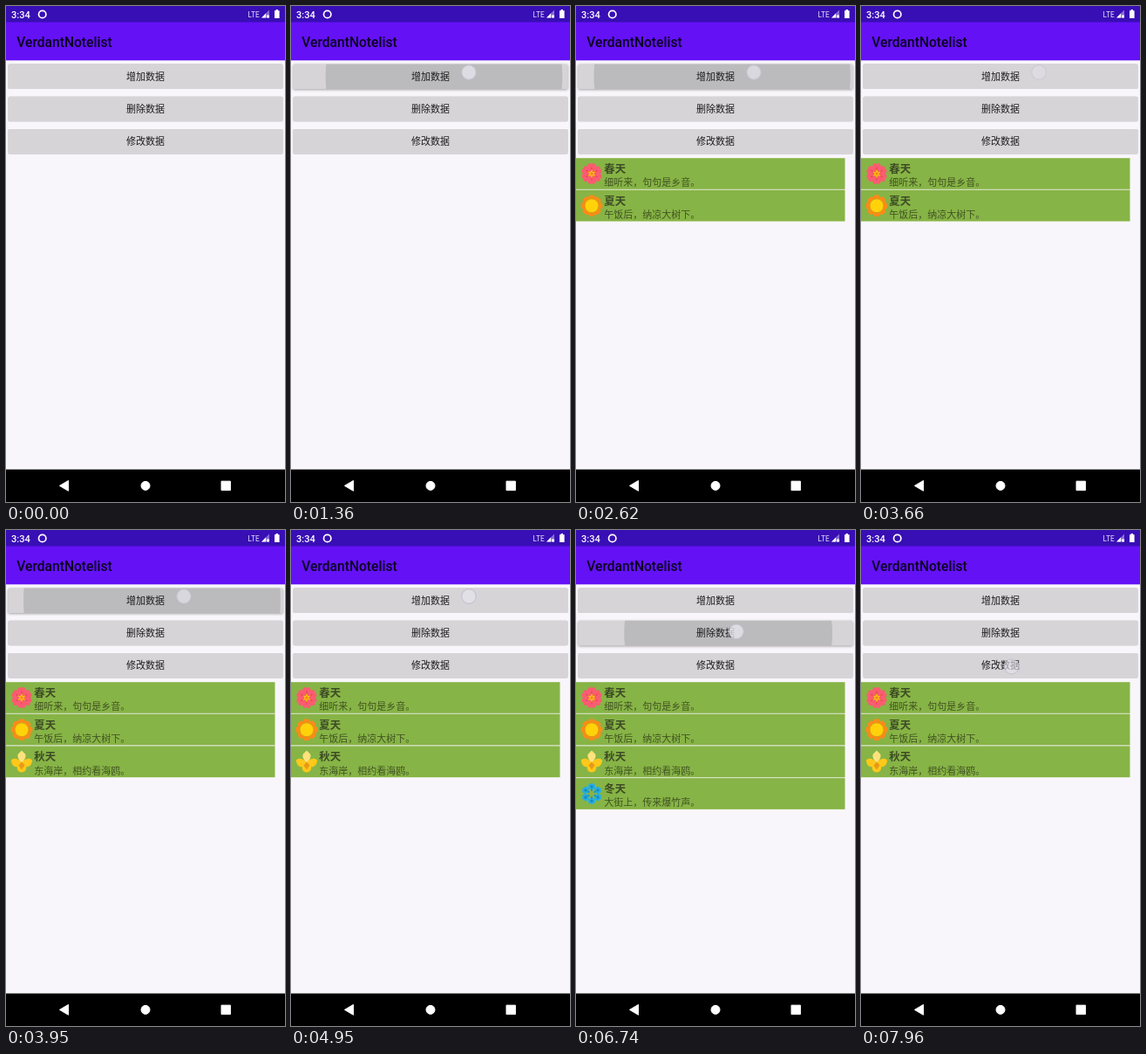
Animation, 320 px wide and 568 px high, one loop 8000 ms. Source, as an HTML page:

```html
<!DOCTYPE html>
<html lang="zh">
<head>
<meta charset="utf-8">
<title>Season list</title>
<style>
  html, body { margin: 0; width: 100%; height: 100%; overflow: hidden; background: #f8f6fa; }
  svg { display: block; width: 320px; height: 568px; }
  text { font-family: Roboto, "Noto Sans CJK SC", "Noto Sans CJK", sans-serif; }
  .label, .title, .verse { font-family: "Noto Sans CJK SC", "Noto Sans CJK", sans-serif; }
  .label { font-size: 11px; fill: #1d1c1e; text-anchor: middle; }
  .title { font-size: 12.4px; font-weight: 700; fill: #3d4c25; }
  .verse { font-size: 11px; fill: #405322; }
</style>
</head>
<body>
<svg viewBox="0 0 320 568">
  <rect width="320" height="568" fill="#f8f6fa"/>
  <rect y="18" width="320" height="44.3" fill="#6411f6"/>
  <rect width="320" height="18.5" fill="#380eb5"/>
  <text x="12.3" y="46.6" font-size="15.6" font-weight="500" fill="#0b0320">VerdantNotelist</text>

  <g fill="#fff">
    <text x="6" y="13.6" font-size="11.1" font-weight="500">3:34</text>
    <circle cx="41.7" cy="9.5" r="4.2" fill="none" stroke="#fff" stroke-width="1.7"/>
    <text x="277.6" y="12.6" font-size="8.3" fill="#e4def5">LTE</text>
    <path d="M293 13.6 302 4.6V13.6Z" fill-opacity=".4"/>
    <path d="M293 13.6 298 8.6V13.6ZM299 10.5h3v3.1h-3Z"/>
    <path d="M308 5.3h1.6v-1.2h2.4v1.2h1.6v8.6h-5.6Z"/>
  </g>

  <g id="rows"></g>
  <g id="buttons"></g>
  <circle id="dot" r="8.3" fill="#e6e5ec" fill-opacity=".8" stroke="#c3c2d0" stroke-width="1.2"/>

  <rect y="530.7" width="320" height="37.3"/>
  <g fill="#fff" stroke="#fff" stroke-linejoin="round">
    <path d="M61.5 549.4 71.5 543.5V555.3Z"/>
    <circle cx="160" cy="549.4" r="5"/>
    <rect x="247" y="544.2" width="10.4" height="10.4"/>
  </g>
</svg>
<script>
const LOOP = 8000, ENTER = 225, EXIT = 150, DOT_FADE = 200;
const BUTTON = { x: 2.5, width: 315, height: 28.6, middle: 160 };
const START_RADIUS = BUTTON.width * 0.3;
const END_RADIUS = Math.hypot(BUTTON.width, BUTTON.height) / 2;

// Each tap: finger down, ripple start and finger up in ms.
const taps = [
  { button: 0, x: 204, y: 76, down: 1080, ripple: 1215, up: 1430 },
  { button: 0, x: 204, y: 76, down: 2300, ripple: 2435, up: 2600 },
  { button: 0, x: 204, y: 76, down: 3640, ripple: 3764, up: 3920 },
  { button: 0, x: 204, y: 76, down: 4900, ripple: 5028, up: 5195 },
  { button: 1, x: 184, y: 116.3, down: 6570, ripple: 6653, up: 7100 },
  { button: 2, x: 172.7, y: 156.5, down: 7920, ripple: 8020, up: 8200 }
];

const clamp = v => Math.max(0, Math.min(1, v));
const mix = (a, b, p) => a + (b - a) * p;
const ring = (count, shape) =>
  Array.from({ length: count }, (_, i) => `<g transform="rotate(${i * 360 / count})">${shape}</g>`).join('');

const flower =
  ring(6, '<path d="M0 0C-7-5-5.5-12-1.5-12L0-11 1.5-12C5.5-12 7-5 0 0" fill="#fb5c71"/>') +
  ring(6, '<path d="M-1.4 0 0-8.5 1.4 0Z" fill="#c92f45"/>') +
  ring(6, '<path d="M-1.8 0 0-5.8 1.8 0Z" fill="#ffc516"/>') +
  '<circle r="1.8" fill="#f58a1d"/>';
const sun =
  ring(8, '<path d="M-4.6-8 -2.7-12.3H2.7L4.6-8 0-6Z" fill="#fb8b17"/>') +
  '<circle r="8" fill="#ffd20a" stroke="#d99a18" stroke-width="1"/>';
const blossom =
  '<path d="M0 1C-6-4-5-9-3-10L0-13 3-10C5-9 6-4 0 1" fill="#ffe27b"/>' +
  '<path d="M0 1C-4-4-9-5-12-2C-12 3-9 6-5 6C-6 9-3 12 0 12C3 12 6 9 5 6C9 6 12 3 12-2C9-5 4-4 0 1" fill="#ffc81a"/>' +
  '<path d="M0 0-3.5 4 0 9 3.5 4Z" fill="#e69a16"/>';
const snowflake =
  ring(6, '<path d="M0-4-3.9-6.2V-10.2L0-12.3 3.9-10.2V-6.2Z" fill="#25aee2"/><circle cy="-8.2" r="1.5" fill="#1685be"/>') +
  ring(6, '<path d="M0-3V-6" stroke="#1c93cb" stroke-width="1.6"/>');

const seasons = [
  ['春天', '细听来，句句是乡音。', flower],
  ['夏天', '午饭后，纳凉大树下。', sun],
  ['秋天', '东海岸，相约看海鸥。', blossom],
  ['冬天', '大街上，传来爆竹声。', snowflake]
];

const byId = id => document.getElementById(id);
byId('rows').innerHTML = seasons.map(([title, verse, icon], i) => `
  <g transform="translate(0 ${174.2 + i * 36.65})">
    ${i ? '<rect y="-1" width="308.5" height="1" fill="#d5dfc4"/>' : ''}
    <rect width="308.5" height="35.7" fill="#87b446"/>
    <g transform="translate(18 17.9)">${icon}</g>
    <text class="title" x="32.3" y="16.9">${title}</text>
    <text class="verse" x="32.3" y="32.2">${verse}</text>
  </g>`).join('');

byId('buttons').innerHTML = ['增加数据', '删除数据', '修改数据'].map((label, i) => {
  const y = 66.4 + i * 37.3;
  const box = `x="${BUTTON.x}" y="${y}" width="${BUTTON.width}" height="${BUTTON.height}" rx="1.5"`;
  return `<g>
    <clipPath id="clip${i}"><rect ${box}/></clipPath>
    <rect class="face" ${box} fill="#d6d4d7"/>
    <g clip-path="url(#clip${i})"><circle class="ripple" cy="${y + BUTTON.height / 2}"/></g>
    <text class="label" x="${BUTTON.middle}" y="${y + 18.4}">${label}</text>
  </g>`;
}).join('');

const rows = [...byId('rows').children];
const faces = [...document.querySelectorAll('.face')];
const ripples = [...document.querySelectorAll('.ripple')];
const dot = byId('dot');

function draw(t) {
  const removal = taps[4].up;
  rows.forEach((row, i) => {
    const shown = t >= taps[i].up && (i < 3 || t < removal);
    row.style.display = shown ? '' : 'none';
  });

  const tap = taps.findLast(item => t >= item.down) || taps[0];
  dot.setAttribute('cx', tap.x);
  dot.setAttribute('cy', tap.y);
  dot.style.opacity = clamp((t - tap.down + 20) / 80) * clamp(1 - (t - tap.up) / DOT_FADE) * (t >= tap.down);

  const fadeStart = Math.max(tap.up, tap.ripple + ENTER);
  const strength = clamp((t - tap.ripple) / 75) * clamp(1 - (t - fadeStart) / EXIT);
  const progress = clamp((t - tap.ripple) / ENTER);
  ripples.forEach((ripple, i) => {
    const level = i === tap.button ? strength : 0;
    ripple.style.opacity = level * 0.125;
    ripple.setAttribute('cx', mix(tap.x, BUTTON.middle, progress));
    ripple.setAttribute('r', mix(START_RADIUS, END_RADIUS, progress));
    faces[i].style.filter = `drop-shadow(0 ${0.7 + level * 0.6}px ${0.7 + level}px rgba(0,0,0,${0.25 + level * 0.1}))`;
  });
}

function tick() {
  draw(performance.now() % LOOP);
  requestAnimationFrame(tick);
}
tick();
</script>
</body>
</html>
```
